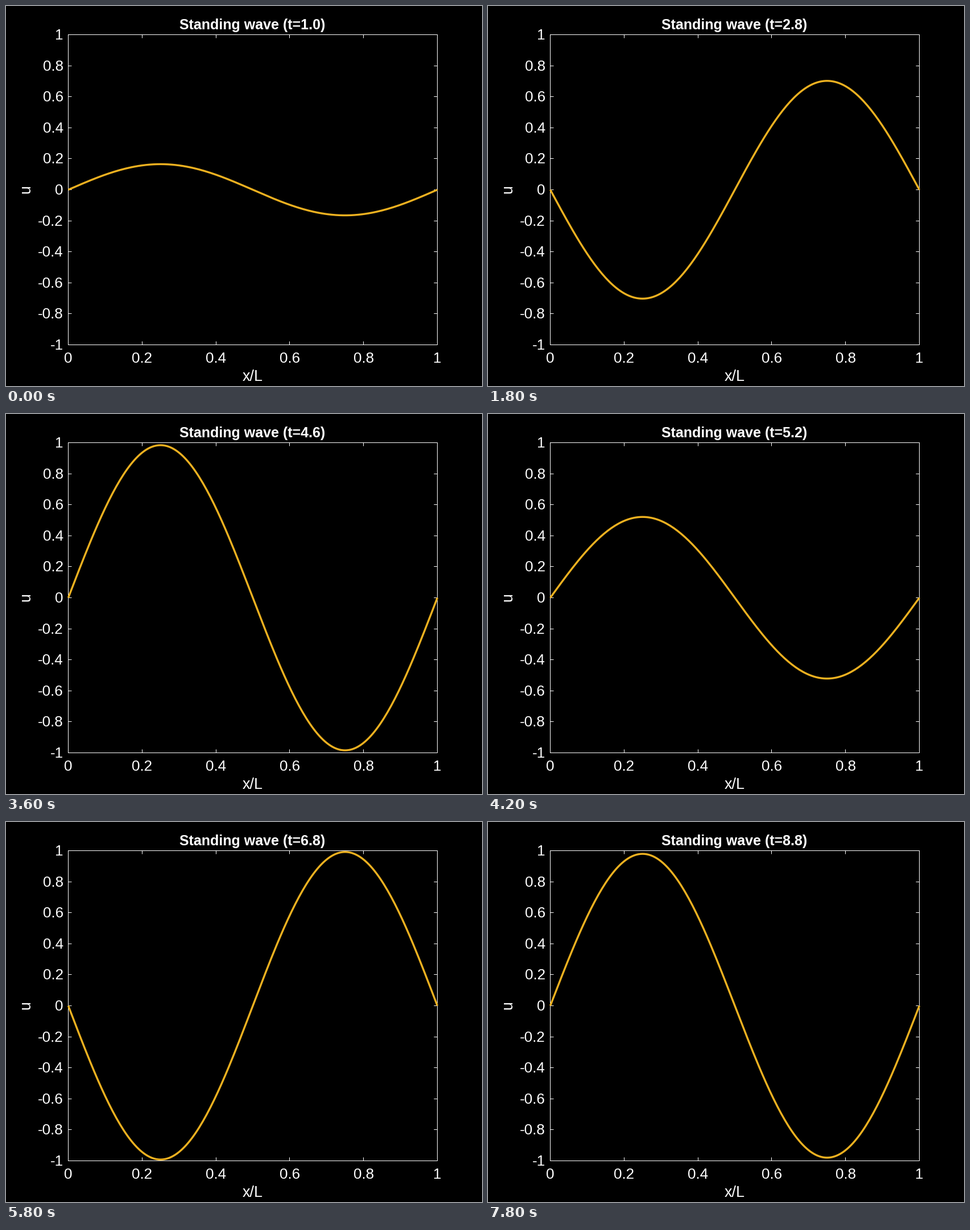
Animation, 837 px wide and 669 px high, one loop 8000 ms. Source, as a matplotlib script:

```python
import math

import numpy as np
import matplotlib.pyplot as plt
from matplotlib.animation import FuncAnimation

W, H, DPI = 837, 669, 64
LEFT, RIGHT, TOP, BOTTOM = 109.5, 758.5, 50.5, 596.5
TICK = 6
FRAMES, INTERVAL = 40, 200
OMEGA = 2 * math.pi / math.sqrt(20)

plt.rcParams["font.family"] = "Liberation Sans"


def pt(px):
    """Pixels to points."""
    return px * 72 / DPI


def to_x(v):
    return LEFT + v * (RIGHT - LEFT)


def to_y(v):
    return (TOP + BOTTOM) / 2 - v * (BOTTOM - TOP) / 2


def crisp(v):
    """Centre of the pixel that holds v."""
    return math.floor(v) + 0.5


fig = plt.figure(figsize=(W / DPI, H / DPI), dpi=DPI, facecolor="black")
ax = fig.add_axes([0, 0, 1, 1])
ax.set_xlim(0, W)
ax.set_ylim(H, 0)
ax.axis("off")


def rule(xs, ys):
    ax.plot(xs, ys, color="white", lw=pt(1), snap=False,
            solid_capstyle="butt", solid_joinstyle="miter", zorder=1)


def label(x, y, text, size=26, **kw):
    return ax.text(x, y, text, color="white", fontsize=pt(size), **kw)


# Box, ticks and tick labels
rule([LEFT, RIGHT, RIGHT, LEFT, LEFT, RIGHT],
     [TOP, TOP, BOTTOM, BOTTOM, TOP, TOP])

for i in range(6):
    v = i / 5
    x = crisp(to_x(v))
    rule([x, x], [BOTTOM, BOTTOM - TICK])
    rule([x, x], [TOP, TOP + TICK])
    label(to_x(v), 628.5, f"{v:g}", ha="center", va="baseline")

for i in range(-5, 6):
    v = i / 5
    y = crisp(to_y(v))
    rule([LEFT, LEFT + TICK], [y, y])
    rule([RIGHT, RIGHT - TICK], [y, y])
    label(101, to_y(v) + 8.5, f"{v:g}", ha="right", va="baseline")

label(434, 660, "x/L", size=27, ha="center", va="baseline")
label(35.5, 323, "u", size=27, ha="center", va="center", rotation=90)
title = label(305, 41, "", size=25, weight="bold", ha="left", va="baseline")

# Second mode of a string fixed at both ends
s = np.linspace(0, 1, 201)
shape = np.sin(2 * math.pi * s)
wave, = ax.plot(to_x(s), to_y(0 * s), color="#edb120", lw=pt(3.4),
                solid_capstyle="butt", zorder=3)


def update(i):
    t = 1 + i * INTERVAL / 1000
    wave.set_ydata(to_y(math.cos(OMEGA * t) * shape))
    title.set_text(f"Standing wave (t={t:.1f})")
    return wave, title


anim = FuncAnimation(fig, update, frames=FRAMES, interval=INTERVAL,
                     repeat=True, repeat_delay=0)
plt.show()
```
